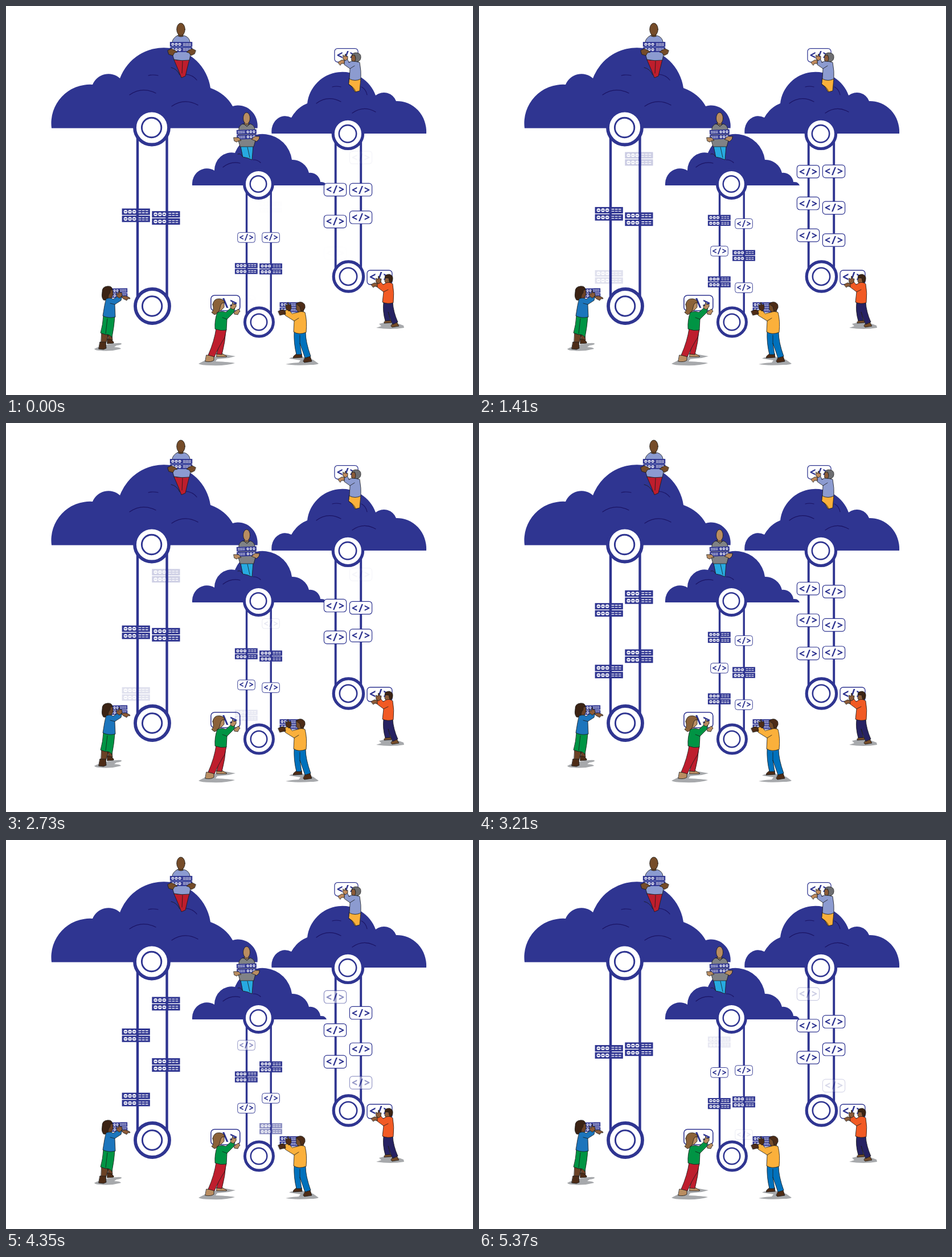
Recreate the animation shown at these times as an HTML page. Size 820 by 683 pixels, loop 5400 ms.

```html
<!DOCTYPE html>
<html lang="en">
<head>
<meta charset="utf-8">
<title>Cloud conveyor</title>
<style>
html, body { margin: 0; width: 100%; height: 100%; overflow: hidden; background: #fff; }
svg { display: block; width: 820px; height: 683px; }
.navy { fill: #2f3591; }
.belt { stroke: #2f3591; fill: none; }
.crease { stroke: #1b1464; stroke-width: 1.2; fill: none; stroke-linecap: round; }
.person { stroke: #1a1a1a; stroke-width: .8; stroke-linejoin: round; stroke-linecap: round; }
.shadow { fill: #a7a9ac; }
text { font: bold 20px "Noto Sans Mono", "DejaVu Sans Mono", monospace; letter-spacing: -1px; text-anchor: middle; fill: #2f3591; }
</style>
</head>
<body>
<svg viewBox="0 0 820 683">
<defs>
  <g id="row">
    <rect class="navy" x="-24.6" y="-5.6" width="49.2" height="11.2"/>
    <g fill="#fff"><circle cx="-18.3" r="3.2"/><circle cx="-10.6" r="3.2"/><circle cx="-3" r="3.2"/></g>
    <path d="M-20.3 0h4M-12.6 0h4M-5 0h4" stroke="#2f3591" stroke-width="1.3"/>
    <path d="M4.5-1.8h17M4.5 1.8h17" stroke="#fff" stroke-width="1.35" stroke-dasharray="4.7 1.4"/>
  </g>
  <g id="server" stroke="none"><use href="#row" y="-6.3"/><use href="#row" y="6.3"/></g>
  <g id="code">
    <rect x="-19.6" y="-11.2" width="39.2" height="22.4" rx="5" fill="#fff" stroke="#2f3591" stroke-width="1.2"/>
    <text x="-.5" y="7" stroke="none">&lt;/&gt;</text>
  </g>
</defs>

<g class="navy">
  <path d="M80 214.5A68 68 0 0 1 152 138A30 30 0 0 1 200 127A82.5 82.5 0 0 1 359 144Q386 154 398 176A34 36 0 0 1 441.5 214.5Z"/>
  <path d="M466.5 224A24 27 0 0 1 501 196Q511 178 529 171A62 62 0 0 1 649 157A23 23 0 0 1 685 167A51 54 0 0 1 738 224Z"/>
  <path d="M327 315A26 27 0 0 1 366 289A30 31 0 0 1 402 258A52 52 0 0 1 502 270A30 30 0 0 1 532 293A18 18 0 0 1 552 309Q560 308 563 315Z"/>
</g>
<path class="crease" d="M250 122q8-2 17 0M217 156q22-15 46-3M291 176q22-15 46-2M316 120q12 1 19 10
  M545 171q20-15 43-3M573 142q7-2 15 0M608 188q20-14 41-2M624 142q8 4 10 14M381 283q14-11 30-7M434 270q8 0 13 5"/>

<g id="wheels"></g>

<g class="person">
  <g fill="#754c29"><path d="M303 48h8v9h-8z"/><ellipse cx="307" cy="41" rx="7.3" ry="11"/></g>
  <path fill="#be1e2d" d="M295 94Q308 97 322 94L318 110L315 123L308 126L302 111Z"/>
  <path fill="#8c9bd0" d="M301 52Q307 56 313 52Q322 55 323 63L326 76L322 95Q308 97 295 94L290 77L292 63Q293 56 301 52Z"/>
  <use href="#server" transform="translate(307.5 72)scale(.8 .75)"/>
  <path fill="#754c29" d="M284 78l6-3 5 2 6 4-5 1-3 5-7-2zM333 78l-6-3-5 2-5 4 4 1 4 5 6-3z"/>
  <path fill="none" d="M310 97l-1 21M290 108q10 2 15 13"/>
</g>

<g class="person">
  <g fill="#b98d61"><path d="M419 203h7v7h-7z"/><ellipse cx="422.5" cy="197" rx="6" ry="10"/></g>
  <path fill="#27aae1" d="M412 245H434L432 270Q424 266 416 265Z"/>
  <path fill="#808285" d="M416 207Q423 211 429 207Q436 209 437 217L439 232L435 247H411L407 233L409 215Q410 209 416 207Z"/>
  <path fill="none" d="M418 207l5 5 5-5M424 248l4 18M407 260q5-2 8 4"/>
  <use href="#server" transform="translate(422.5 225.5)rotate(-2)scale(-.71 .7)"/>
  <path fill="#b98d61" d="M400 231l8 0 5 5-5 1-3 2-4-2zM445 229l-8 0-6 5 5 2 4 2 4-4z"/>
</g>

<g class="person">
  <use href="#code" transform="translate(597.5 86.5)scale(1.05)"/>
  <path fill="#fbb03b" d="M603 127Q614 132 623 127L621 149L613 151Q608 141 602 137Z"/>
  <path fill="#8c5b38" d="M607 87l5-2 3 9-2 5-6-3z"/>
  <path fill="#6d6e71" d="M607 87Q608 82 615 82Q624 83 623 91Q622 99 612 98Q616 92 612 86Z"/>
  <path fill="#8c9bd0" d="M607 97Q615 97 621 99Q624 115 623 128Q613 133 603 128L604 110L594 103L594 94L599 92L602 99Z"/>
  <path fill="#c08a5c" d="M592 86l2 3 2-5 1 5 3-1 0 5-4 3-4-3zM583 99l6-4 5 0 0 6-5 0-2 3z"/>
  <path fill="none" d="M604 110l8-5M602 138q8 3 12 12"/>
</g>

<g class="person">
  <path class="shadow" stroke="none" d="M155 602q10-5 25-8 22-4 23-1 0 2-9 3l-4 3q11 0 12 3-18 5-36 3-10 0-11-3z"/>
  <path fill="#6b4226" d="M168 575l12 2-5 16-8-1zM178 572l8 6 1 9-7 0z"/>
  <path fill="#4d2c17" d="M165 590h10l1 11-5 2-8-1zM178 584l7 2 4 4 0 2-11 1z"/>
  <path fill="#009444" d="M171 544L191 545Q190 562 186 582Q182 576 175 577L166 574Q170 560 171 544Z"/>
  <use href="#server" transform="translate(197.5 504)rotate(-1)scale(.64 .7)"/>
  <path fill="#6b4226" d="M180 497l7 1 1 8-3 7-8 3z"/>
  <path fill="#3b2314" d="M169 503Q168 493 178 492Q186 491 187 498Q182 498 183 503Q179 507 179 513Q176 518 171 516Q167 511 169 503Z"/>
  <path fill="#1c75bc" d="M176 514Q184 511 188 515L197 509L204 507L202 517L191 524L192 546Q180 549 170 544L173 526Z"/>
  <path fill="#8c5b38" d="M194 503l3 3 2-7 1 5 3-1 1 6-5 4-4-3zM203 510l7-1 7 3 1 2-4 0-2 3-6-3z"/>
  <path fill="none" d="M191 524l-8-2M178 549l-3 26"/>
</g>

<g class="person">
  <path class="shadow" stroke="none" d="M338 628l22-11 26-5 17 3-12 3-20 2-3 4q26 1 34 3-15 5-42 4-18 0-22-3z"/>
  <use href="#code" transform="translate(385.3 521.5)scale(-1.3 1.2)"/>
  <path fill="#b98d61" d="M352 613l13 1 0 8q-5 4-15 2zM370 610h9l9 5-1 1h-17z"/>
  <path fill="#be1e2d" d="M386 569Q385 590 379 612L370 611L374 595Z"/>
  <path fill="#be1e2d" d="M369 566L387 568L384 582Q372 601 366 616L355 613Q366 588 369 566Z"/>
  <path fill="#b98d61" d="M377 517l6 4 0 8-5 5-7 4z"/>
  <path fill="#8b6239" d="M363 524Q365 513 375 514Q383 515 384 521Q377 520 376 529Q374 540 366 542L361 538Q366 534 363 524Z"/>
  <path fill="#009444" d="M371 538Q380 535 386 538L396 529L402 530L400 538L388 550L387 569Q377 571 367 567Q366 551 371 538Z"/>
  <path fill="#b98d61" d="M394 525l2 2 2-7 2 4 4-1 0 5-5 5-4-2zM401 537l7-5 3 4-2 2-2 4-6-1z"/>
  <path fill="none" d="M388 550l-8-3"/>
</g>

<g class="person">
  <path class="shadow" stroke="none" d="M549 628l-10-7-18-5-20 1-4 2 20 3-3 4q-16 1-23 3 20 3 44 1 10 0 14-2z"/>
  <use href="#server" transform="translate(497.5 529)scale(.69 .74)"/>
  <path fill="#4d2c17" d="M511 610h8l1 7-16 1 1-3zM526 616l8-1 3 9-13 2-2-2z"/>
  <path fill="#0071bc" d="M506 572L526 573Q526 590 535 615L525 618Q520 603 516 592L519 612L510 612Q505 592 506 572Z"/>
  <path fill="#754c29" d="M510 522l8-1 6 9-2 7-8 1-4-5z"/>
  <path fill="#4d2c17" d="M510 523Q513 519 519 520Q526 522 525 530Q523 535 518 536L516 528Z"/>
  <path fill="#fbb03b" d="M512 538Q519 535 525 538Q529 553 527 573Q514 578 505 572L506 553L490 543L488 536L496 532L502 540Z"/>
  <path fill="#4d2c17" d="M491 524l3 2 1-6 2 5 3-1 1 7-4 5-5-4zM478 536l7-3 5 2 1 6-6 1-4 1z"/>
  <path fill="none" d="M506 553l8-5M516 592l0-14"/>
</g>

<g class="person">
  <path class="shadow" stroke="none" d="M650 565l9-3-4-4 13-3 16 1 14 5 1 4q-23 4-49 0z"/>
  <use href="#code" transform="translate(656 476.5)scale(1.12)"/>
  <path fill="#754c29" d="M667 552l9 0 1 4-13 1 0-2zM680 556l6-1 4 7-12 2-2-2z"/>
  <path fill="#262262" d="M663 520L679 520Q680 537 688 555L679 559Q674 548 671 537L675 552L666 553Q661 536 663 520Z"/>
  <path fill="#8c5b38" d="M667 475l9 0 2 8-4 5-7-1-2-4z"/>
  <path fill="#3b2314" d="M665 477Q665 471 673 471Q680 473 679 480Q678 486 674 486L672 478Z"/>
  <path fill="#f15a24" d="M668 486Q674 484 679 488Q682 504 680 521Q670 524 661 520L663 502L651 493L651 487L657 483L662 489Z"/>
  <path fill="#8c5b38" d="M650 478l3 2 1-6 2 5 3 0-1 6-4 3-4-3zM641 489l6-3 5 1 0 6-4-1-3 2z"/>
  <path fill="none" d="M663 502l8-4"/>
</g>

<g id="items"></g>
</svg>
<script>
const LOOP = 5400;
const svgNode = (parent, tag, attrs) => {
  const el = document.createElementNS("http://www.w3.org/2000/svg", tag);
  for (const key in attrs) el.setAttribute(key, attrs[key]);
  return parent.appendChild(el);
};
const wheelLayer = document.getElementById("wheels");
const itemLayer = document.getElementById("items");

// x, top, bottom, ring radius, hub radius, ring width, belt positions, belt width
const conveyors = [
  [256, 213.5, 527, 30, 17.2, 5.8, [231, 282.5], 4.4],
  [443.4, 312.5, 555, 25, 14.3, 5, [422.5, 465.2], 3.4],
  [600.4, 224.3, 475, 26.2, 15.2, 5.2, [578.7, 623.2], 3.9]
];
for (const [x, top, bottom, r, hub, w, belts, beltWidth] of conveyors) {
  for (const b of belts)
    svgNode(wheelLayer, "path", { class: "belt", d: `M${b} ${top}V${bottom}`, "stroke-width": beltWidth });
  [[x, top], [x + 1, bottom]].forEach(([cx, cy]) => {
    svgNode(wheelLayer, "circle", { class: "belt", cx, cy, r, "stroke-width": w, style: "fill:#fff" });
    svgNode(wheelLayer, "circle", { class: "belt", cx: cx - .4, cy, r: hub, "stroke-width": w / 2 });
  });
}

// kind, x, scale, first y, px per ms, life, fade, start times
const even = [-1800, 0, 1800, 3600], odd = [-900, 900, 2700, 4500];
const lanes = [
  ["server", 228.2, 1, 477.5, -.082, 2585, 150, [-1341, 37, 1389, 2709, 4084]],
  ["server", 280.9, 1, 265.5, .0783, 2585, 150, [-1360, 22, 1374, 2697, 4071]],
  ["code", 422, .78, 517, -.0614, 2700, 270, even],
  ["server", 421.8, .81, 515, -.06, 2700, 270, odd],
  ["code", 465, .78, 350.2, .0625, 2700, 270, odd],
  ["server", 465, .81, 353, .0603, 2700, 270, even],
  ["code", 578, 1, 434.3, -.0622, 2700, 270, [-1797, -897, 0, 902, 1799, 2735, 3629, 4530]],
  ["code", 623, 1, 265.2, .0627, 2700, 270, [-1687, -914, -12, 1010, 1785, 2720, 3739, 4512]]
];
const items = lanes.flatMap(([kind, x, scale, y, speed, life, fade, starts]) =>
  starts.map(start => ({ x, scale, y, speed, life, fade, start,
    el: svgNode(itemLayer, "use", { href: "#" + kind }) })));

function draw() {
  const t = performance.now() % LOOP;
  for (const { el, x, scale, y, speed, life, fade, start } of items) {
    const age = t - start;
    const alpha = Math.max(0, Math.min(1, age / fade, (life - age) / fade));
    el.setAttribute("opacity", alpha);
    el.setAttribute("transform", `translate(${x} ${y + speed * age})scale(${scale})`);
  }
  requestAnimationFrame(draw);
}
draw();
</script>
</body>
</html>
```
